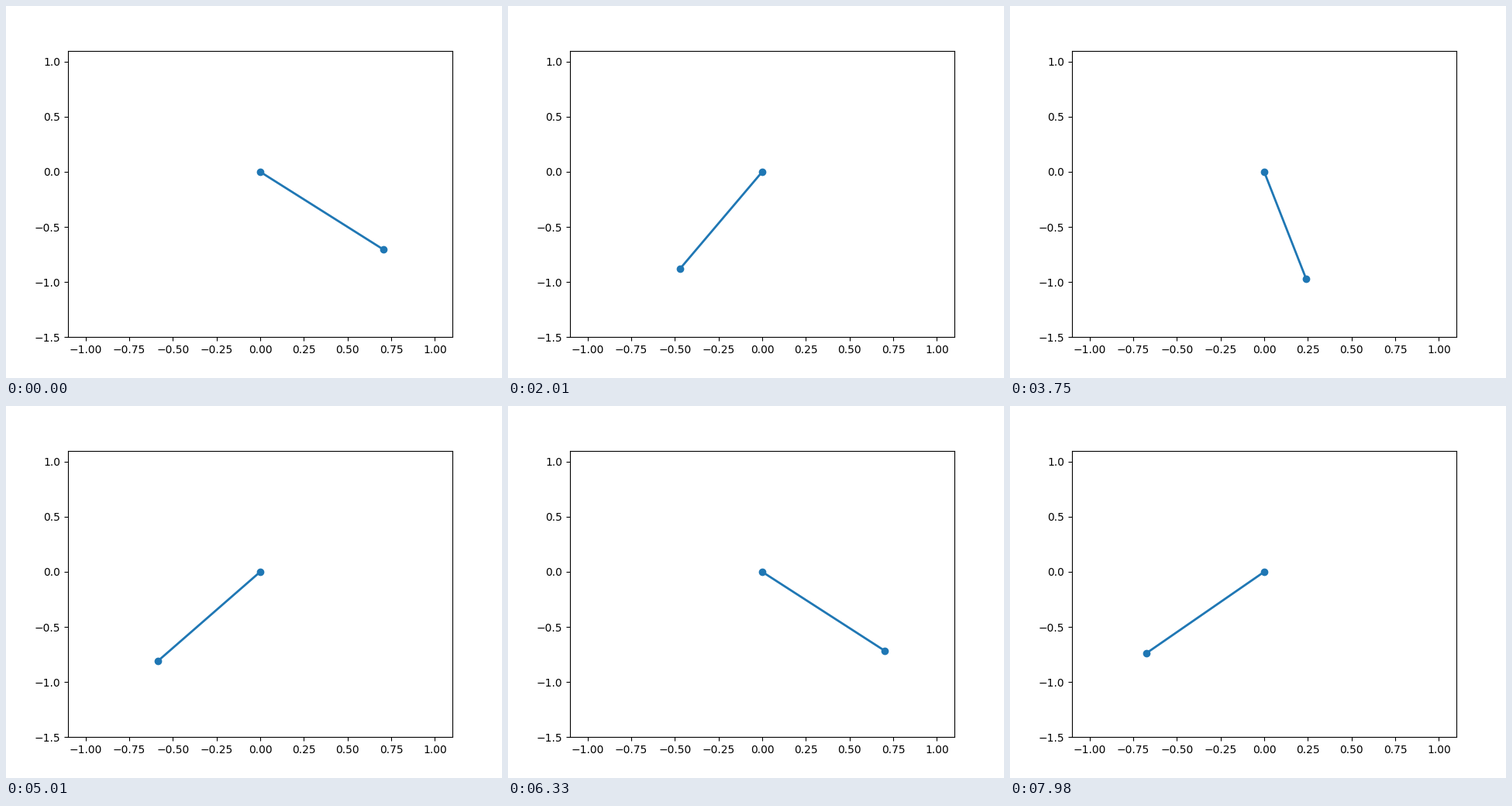
Animation, 640 px wide and 480 px high, one loop 8 s. Source, as a matplotlib script:

```python
import numpy as np
import matplotlib.pyplot as plt
from matplotlib.animation import FuncAnimation

LOOP_MS = 8000
FRAMES = 267
G, LENGTH = 9.81, 1.0
DT = 10 / 499
SUBSTEPS = 4


def slope(state):
    theta, omega = state
    return np.array([omega, -G / LENGTH * np.sin(theta)])


def rk4(state, h):
    k1 = slope(state)
    k2 = slope(state + h / 2 * k1)
    k3 = slope(state + h / 2 * k2)
    k4 = slope(state + h * k3)
    return state + h / 6 * (k1 + 2 * k2 + 2 * k3 + k4)


def swing(theta0, count):
    state = np.array([theta0, 0.0])
    angles = []
    for _ in range(count):
        angles.append(state[0])
        for _ in range(SUBSTEPS):
            state = rk4(state, DT / SUBSTEPS)
    return np.array(angles)


angles = swing(np.pi / 4, FRAMES)
xs = LENGTH * np.sin(angles)
ys = -LENGTH * np.cos(angles)

fig, ax = plt.subplots(figsize=(6.4, 4.8), dpi=100)
ax.set_xlim(-1.1, 1.1)
ax.set_ylim(-1.5, 1.1)
rod, = ax.plot([], [], "o-", lw=2, color="tab:blue")


def update(i):
    rod.set_data([0, xs[i]], [0, ys[i]])
    return rod,


anim = FuncAnimation(fig, update, frames=FRAMES, interval=LOOP_MS / FRAMES,
                     repeat=True, repeat_delay=0)
plt.show()
```
